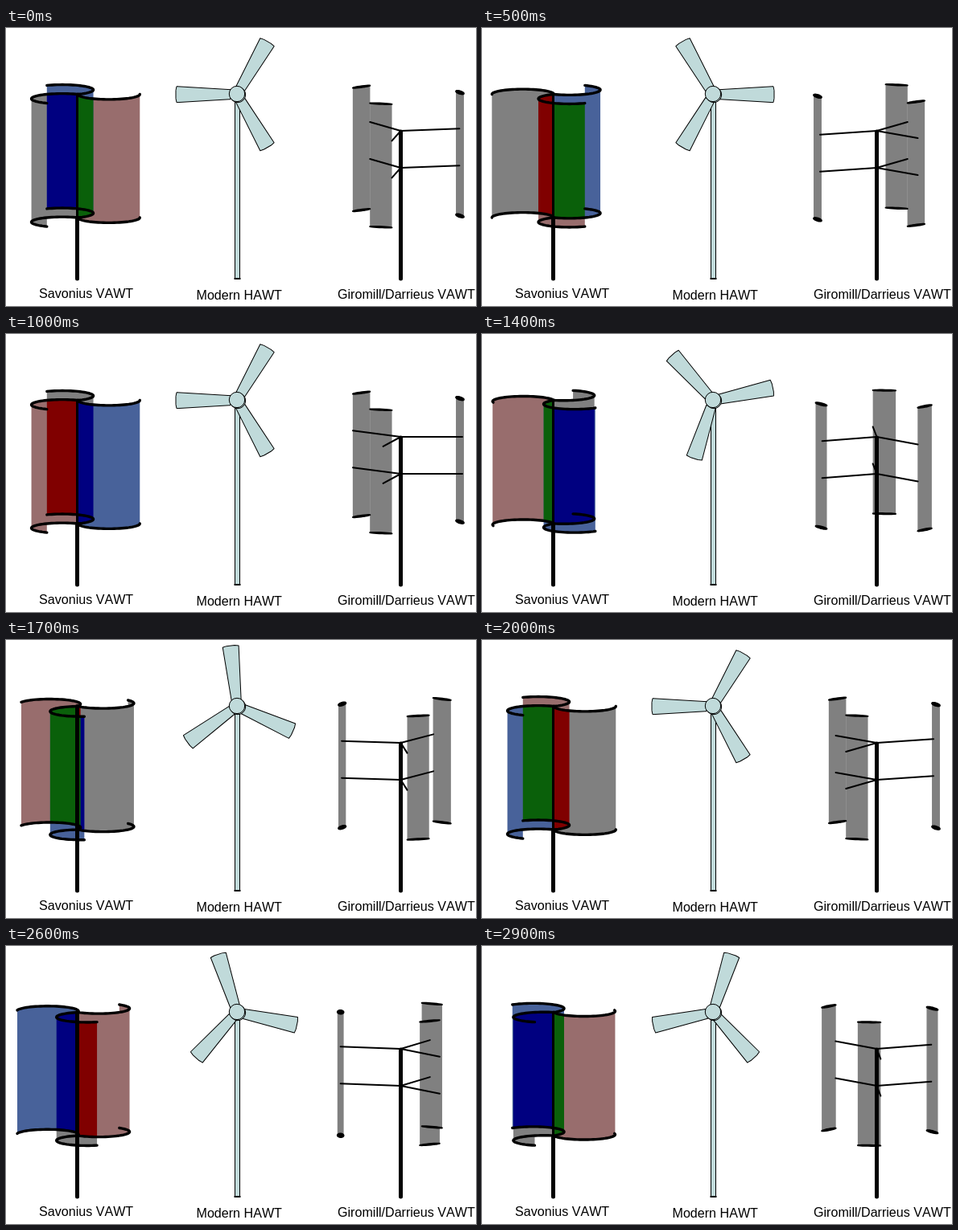
An HTML page with a canvas that plays this animation: 584x346 px, repeating every 3000 ms.

```html
<!DOCTYPE html>
<html lang="en">
<head>
<meta charset="utf-8">
<title>Wind turbine types</title>
<style>
  html, body { margin: 0; width: 100%; height: 100%; overflow: hidden; background: #fff; }
  canvas { display: block; }
</style>
</head>
<body>
<canvas id="stage" width="584" height="346"></canvas>
<script>
const ctx = document.getElementById('stage').getContext('2d');
const RAD = Math.PI / 180;
const STEP_MS = 100, STEPS = 30, STEP_ANGLE = 12;
const TILT = 0.166;      // foreshortening of the ground plane
const TOP = 82.5, HEIGHT = 153.5;

const SCOOP_COLORS = ['#986d6d', '#808080', '#48629a'];
// Overlap of scoop i with scoop i + 1
const OVERLAP_COLORS = ['#800000', '#000080', '#0a600a'];

function line(points, width) {
  ctx.beginPath();
  points.forEach(([x, y]) => ctx.lineTo(x, y));
  ctx.lineWidth = width;
  ctx.strokeStyle = '#000';
  ctx.stroke();
}

function polygon(points, fill, width) {
  ctx.beginPath();
  points.forEach(([x, y]) => ctx.lineTo(x, y));
  ctx.closePath();
  ctx.fillStyle = fill;
  ctx.fill();
  ctx.lineWidth = width;
  ctx.strokeStyle = '#000';
  ctx.stroke();
}

const lower = (points, dy = HEIGHT) => points.map(([x, y]) => [x, y + dy]);

// Area covered by a curve moved straight down
function sweep(points) {
  const path = new Path2D();
  for (let i = 1; i < points.length; i++) {
    const [a, b] = [points[i - 1], points[i]].sort((p, q) => p[0] - q[0]);
    path.moveTo(a[0], a[1]);
    path.lineTo(b[0], b[1]);
    path.lineTo(b[0], b[1] + HEIGHT);
    path.lineTo(a[0], a[1] + HEIGHT);
    path.closePath();
  }
  return path;
}

function fillPath(path, color) {
  ctx.fillStyle = color;
  ctx.fill(path);
}

// Half circle from the axis to the rim
function scoopCurve(axis, angle) {
  const r = 38.5, points = [];
  const c = Math.cos(angle * RAD), s = Math.sin(angle * RAD);
  for (let d = 0; d <= 180; d += 5) {
    const along = r - r * Math.cos(d * RAD), out = r * Math.sin(d * RAD);
    points.push([axis + along * c - out * s, TOP + (along * s + out * c) * TILT]);
  }
  return points;
}

function drawSavonius(turn) {
  const axis = 89.3, pole = 88.5;
  const curves = [0, 1, 2].map(i => scoopCurve(axis, turn + i * 120));
  const areas = curves.map(sweep);
  areas.forEach((area, i) => fillPath(area, SCOOP_COLORS[i]));
  areas.forEach((area, i) => {
    ctx.save();
    ctx.clip(area);
    fillPath(areas[(i + 1) % 3], OVERLAP_COLORS[i]);
    ctx.restore();
  });
  const phase = turn % 120;
  const exposed = phase >= 72 && phase <= 96;
  ctx.lineCap = 'round';
  line([[pole, TOP], [pole, TOP + HEIGHT]], exposed ? 5 : 3);
  line([[pole, TOP + HEIGHT + 2], [pole, 312]], 5);
  curves.forEach(curve => {
    line(curve, 3.4);
    line(lower(curve), 3.4);
  });
}

function drawHawt(turn) {
  const [x, y] = [287, 82], fill = '#c0dada';
  ctx.lineCap = 'butt';
  polygon([[284.5, 92], [290.5, 92], [290.5, 312], [284.5, 312]], fill, 1);
  line([[283.5, 312], [291.5, 312]], 2);
  for (let i = 0; i < 3; i++) {
    ctx.save();
    ctx.translate(x, y + 0.7);
    ctx.rotate((turn + 60 + i * 120) * RAD);
    polygon([[8, -6], [75, -10], [76, -5], [76, 5], [75, 10], [8, 6]], fill, 1);
    ctx.restore();
  }
  for (const shift of [1, 0]) {
    ctx.beginPath();
    ctx.arc(x + shift, y + shift, 9.7, 0, 2 * Math.PI);
    ctx.fillStyle = fill;
    ctx.fill();
    ctx.lineWidth = 1;
    ctx.stroke();
  }
}

// Point on a foil: share 0 is the leading edge, 1 the trailing edge
function foilPoint(axis, angle, share, bulge = 0) {
  const c = Math.cos(angle * RAD), s = Math.sin(angle * RAD);
  const radial = 76.5 - 6 * share + bulge, back = 28 * share;
  return [axis + radial * c + back * s, TOP + (radial * s - back * c) * TILT];
}

function foilOutline(axis, angle) {
  const points = [];
  for (let d = 0; d <= 360; d += 15) {
    const share = (1 - Math.cos(d * RAD)) / 2;
    points.push(foilPoint(axis, angle, share, 4 * Math.sin(d * RAD)));
  }
  return points;
}

function drawGiromill(turn) {
  const axis = 490.5, mounts = [0.6, 1, 0];
  const angles = mounts.map((_, i) => turn + i * 120);
  const outlines = angles.map(angle => foilOutline(axis, angle));
  ctx.lineJoin = 'round';
  outlines.forEach(outline => fillPath(sweep(outline), '#808080'));
  outlines.forEach(outline => {
    polygon(outline, '#000', 1.8);
    polygon(lower(outline), '#000', 1.8);
  });
  ctx.lineCap = 'round';
  mounts.forEach((share, i) => {
    const arm = [[axis, TOP], foilPoint(axis, angles[i], share)];
    line(lower(arm, 45.5), 2);
    line(lower(arm, 91.5), 2);
  });
  line([[axis, 129], [axis, 312]], 5);
}

function drawLabels() {
  ctx.font = '16.1px "Liberation Sans", Arial, sans-serif';
  ctx.fontKerning = 'none';
  ctx.fillStyle = '#000';
  ctx.fillText('Savonius VAWT', 41, 336);
  ctx.fillText('Modern HAWT', 236.5, 338);
  ctx.fillText('Giromill/Darrieus VAWT', 412, 337);
}

function draw() {
  const turn = Math.floor(performance.now() / STEP_MS) % STEPS * STEP_ANGLE;
  ctx.fillStyle = '#fff';
  ctx.fillRect(0, 0, 584, 346);
  drawSavonius(turn);
  drawHawt(turn);
  drawGiromill(turn);
  drawLabels();
  requestAnimationFrame(draw);
}
draw();
</script>
</body>
</html>
```
